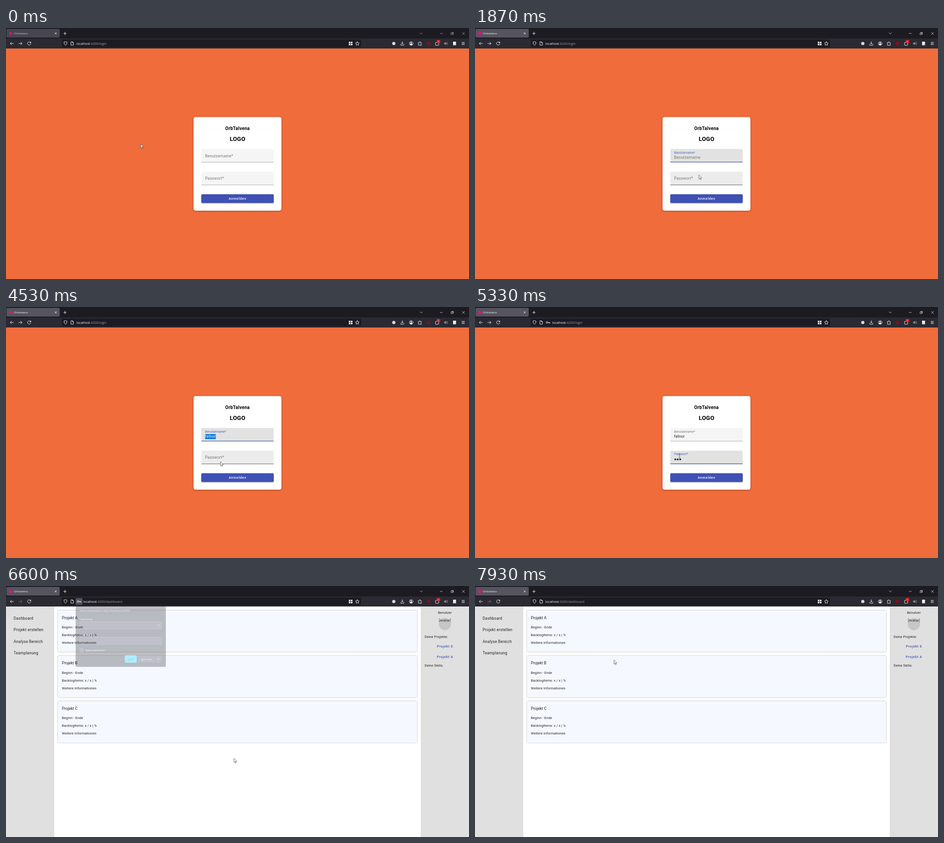
These frames come from a looping animation (1017 px wide and 551 px high, 8 s). An HTML page:

```html
<!DOCTYPE html>
<html lang="de">
<head>
<meta charset="utf-8">
<title>Login</title>
<style>
html, body { margin: 0; width: 100%; height: 100%; overflow: hidden; background: #fff; }
svg { display: block; width: 1017px; height: 551px; font-family: Roboto, sans-serif; }
.ui { font-family: "Open Sans", sans-serif; fill: #fbfbfe; }
.line { fill: none; stroke: #fbfbfe; stroke-width: .9; stroke-linecap: round; stroke-linejoin: round; }
.mid { text-anchor: middle; }
.big { font-size: 8.475px; letter-spacing: .265px; }
.small { font-size: 7.42px; letter-spacing: .13px; }
.btn { font-size: 7.42px; letter-spacing: .66px; font-weight: 500; }
.pop { font-size: 5.85px; }
.card { filter: drop-shadow(0 .6px .8px #0006); }
.soft { animation: 8s linear infinite; }
.hard { animation: 8s step-end infinite; }

#tab { animation-name: tab; }
#title, #fav, #win { animation-name: wake; }
#forward { animation-name: forward; }
#key { animation-name: key; }
#keybox { animation-name: keybox; }
#url { animation-name: url; }
#login { animation-name: login; }
#dash { animation-name: dash; }
#box1 { animation-name: box1; }
#box2 { animation-name: box2; }
#under1 { animation-name: under1; }
#under2 { animation-name: under2; }
#blue1 { animation-name: blue1; transform-origin: 508.5px 294px; }
#blue2 { animation-name: blue2; transform-origin: 508.5px 344px; }
#label1 { animation-name: label1; }
#label2 { animation-name: label2; }
#hint1 { animation-name: hint1; }
#hint2 { animation-name: hint2; }
#button { animation-name: button; }
#ripple { animation-name: ripple; }
#popup { animation-name: popup; }
#later { animation-name: later; }
#cursor { animation-name: move; }
#arrow { animation-name: arrow; }
#beam { animation-name: beam; }
#hand { animation-name: hand; }

@keyframes tab { 0% { fill: #464550; } 11.3%, 100% { fill: #55545f; } }
@keyframes wake { 0% { opacity: .72; } 11.3%, 100% { opacity: 1; } }
@keyframes forward { 0% { opacity: 1; } 82.5%, 100% { opacity: .4; } }
@keyframes key { 0% { opacity: 0; } 62.5% { opacity: 1; } 98.4%, 100% { opacity: 0; } }
@keyframes keybox { 0% { opacity: 0; } 82.5% { opacity: 1; } 98.4%, 100% { opacity: 0; } }
@keyframes url { 0% { transform: none; } 62.5% { transform: translateX(15px); } 98.4%, 100% { transform: none; } }
@keyframes login { 0% { visibility: visible; } 82.5%, 100% { visibility: hidden; } }
@keyframes dash { 0% { visibility: hidden; } 82.5%, 100% { visibility: visible; } }
@keyframes box1 { 0% { fill: #f5f5f5; } 8.3% { fill: #ececec; } 12.5% { fill: #e2e2e2; } 58.8%, 100% { fill: #f5f5f5; } }
@keyframes box2 { 0% { fill: #f5f5f5; } 18% { fill: #ececec; } 58.8% { fill: #e2e2e2; } 81.3%, 100% { fill: #f5f5f5; } }
@keyframes under1 { 0% { fill: #8d8d8d; } 8.3% { fill: #212121; } 16%, 100% { fill: #8d8d8d; } }
@keyframes under2 { 0% { fill: #8d8d8d; } 18% { fill: #212121; } 67.6%, 100% { fill: #8d8d8d; } }
@keyframes blue1 {
  0%, 12.5% { opacity: 0; transform: scaleX(0); }
  14.7%, 58.8% { opacity: 1; transform: none; }
  61%, 100% { opacity: 0; transform: none; }
}
@keyframes blue2 {
  0%, 58.8% { opacity: 0; transform: scaleX(0); }
  61%, 80.9% { opacity: 1; transform: none; }
  83%, 100% { opacity: .4; transform: none; }
}
@keyframes label1 {
  0%, 12.5% { transform: translate(437.3px, 283.5px); fill: #747474; }
  14.4%, 58.8% { transform: translate(437.3px, 275.6px) scale(.75); fill: #4e5eba; }
  60.6%, 100% { transform: translate(437.3px, 275.6px) scale(.75); fill: #747474; }
}
@keyframes label2 {
  0%, 58.8% { transform: translate(437.3px, 333.3px); fill: #747474; }
  60.6%, 80.9% { transform: translate(437.3px, 325.4px) scale(.75); fill: #4e5eba; }
  82.4%, 100% { transform: translate(437.3px, 325.4px) scale(.75); fill: #686a78; }
}
@keyframes hint1 { 0% { opacity: 0; } 14% { opacity: 1; } 29.1%, 100% { opacity: 0; } }
@keyframes hint2 { 0% { opacity: 0; } 60.4% { opacity: 1; } 62.5%, 100% { opacity: 0; } }
@keyframes button { 0% { fill: #3f51b5; } 73.6%, 100% { fill: #e96e40; } }
@keyframes ripple { 0%, 80.8% { r: 0; } 81.6% { r: 51px; } 83%, 100% { r: 80px; } }
@keyframes popup {
  0%, 82.4% { opacity: 0; }
  82.5%, 83.3% { opacity: .3; }
  85%, 97.4% { opacity: 1; }
  98.3% { opacity: .45; }
  99%, 100% { opacity: 0; }
}
@keyframes later { 0% { fill: #42414d; } 94.4%, 100% { fill: #5b5a66; } }
@keyframes move {
  0%, 1.6% { transform: translate(295.5px, 254.3px); }
  5% { transform: translate(385px, 270px); }
  9% { transform: translate(474px, 300px); }
  11.5%, 13% { transform: translate(468px, 287px); }
  16% { transform: translate(478px, 302px); }
  21.6%, 54.1% { transform: translate(491.5px, 322.5px); }
  57% { transform: translate(468px, 342px); }
  59%, 66.8% { transform: translate(449.2px, 326.4px); }
  69% { transform: translate(350px, 375px); }
  70.5% { transform: translate(308px, 397px); }
  72% { transform: translate(400px, 398px); }
  75%, 83.3% { transform: translate(500.5px, 378.3px); }
  86.6%, 90% { transform: translate(316px, 342.5px); }
  95%, 100% { transform: translate(305px, 162.2px); }
}
@keyframes arrow {
  0% { opacity: 1; }
  10.5% { opacity: 0; }
  14% { opacity: 1; }
  29.1% { opacity: 0; }
  54.1% { opacity: 1; }
  58.2% { opacity: 0; }
  67.5% { opacity: 1; }
  73.6% { opacity: 0; }
  82.5%, 100% { opacity: 1; }
}
@keyframes beam {
  0% { opacity: 0; }
  10.5% { opacity: 1; }
  14% { opacity: 0; }
  58.2% { opacity: 1; }
  67.5%, 100% { opacity: 0; }
}
@keyframes hand { 0% { opacity: 0; } 73.6% { opacity: 1; } 82.5%, 100% { opacity: 0; } }
</style>
</head>
<body>
<svg viewBox="0 0 1017 551">
  <defs>
    <g id="project">
      <rect class="card" x="114" y="53.5" width="789" height="91.3" rx="2" fill="#f5f8ff"/>
      <g class="small" fill="#212121">
        <text x="122.8" y="93.2">Beginn - Ende</text>
        <text x="122.8" y="110.2">Backlogitems: x / x | %</text>
        <text x="122.8" y="127.1">Weitere Informationen</text>
      </g>
    </g>
    <clipPath id="clip"><rect x="429" y="365" width="159" height="19" rx="2"/></clipPath>
  </defs>

  <g id="login" class="hard">
    <rect y="45" width="1017" height="506" fill="#f16c3b"/>
    <rect x="412" y="195.5" width="193" height="205.5" rx="4.2" fill="#fff" style="filter:drop-shadow(0 1.5px 2px #0005)"/>
    <g class="mid" font-weight="700">
      <text x="508.5" y="224.1" font-size="10" letter-spacing=".3">OrbTalvena</text>
      <text x="508.7" y="247.7" font-size="12.9" letter-spacing=".3">LOGO</text>
    </g>
    <g class="big">
      <path id="box1" class="hard" d="M429 295V267.5q0-2 2-2H586q2 0 2 2V295z"/>
      <rect id="under1" class="hard" x="429" y="294.3" width="159" height=".7"/>
      <rect id="blue1" class="soft" x="429" y="293.8" width="159" height="1.2" fill="#3f51b5"/>
      <text id="label1" class="soft">Benutzername*</text>
      <text id="hint1" class="hard" x="437.3" y="287.3" fill="#757575">Benutzername</text>
      <rect id="marked" x="437.3" y="279" height="11" fill="#0078d7"/>
      <text id="user" x="437.3" y="287.3"></text>
      <path id="box2" class="hard" d="M429 345V317.5q0-2 2-2H586q2 0 2 2V345z"/>
      <rect id="under2" class="hard" x="429" y="344.1" width="159" height=".7"/>
      <rect id="blue2" class="soft" x="429" y="343.7" width="159" height="1.2" fill="#3f51b5"/>
      <text id="label2" class="soft">Passwort*</text>
      <text id="hint2" class="hard" x="437.3" y="337.2" fill="#757575">Passwort</text>
      <g id="dots" fill="#212121">
        <circle cx="440" cy="334.6" r="2"/><circle cx="445.4" cy="334.6" r="2"/><circle cx="450.8" cy="334.6" r="2"/>
      </g>
      <rect id="caret" width=".7" height="11" fill="#212121"/>
    </g>
    <rect id="button" class="hard" x="429" y="365" width="159" height="19" rx="2" style="filter:drop-shadow(0 1px 1px #0006)"/>
    <g clip-path="url(#clip)"><circle id="ripple" class="soft" cx="500.5" cy="379" fill="#fff" opacity=".1"/></g>
    <text class="btn mid" x="508.6" y="376.8" fill="#fff">Anmelden</text>
  </g>

  <g id="dash" class="hard">
    <rect y="45" width="1017" height="506" fill="#fff"/>
    <path d="M0 45H106V551H0zM911 45h106V551H911z" fill="#e0e0e0"/>
    <use href="#project"/>
    <use href="#project" y="99.6"/>
    <use href="#project" y="199.2"/>
    <g font-size="8.475" fill="#212121">
      <text x="122.8" y="72.7">Projekt A</text>
      <text x="122.8" y="172.3">Projekt B</text>
      <text x="122.8" y="271.9">Projekt C</text>
    </g>
    <g class="big" fill="#212121">
      <text x="16.8" y="73.6">Dashboard</text>
      <text x="16.8" y="99.1">Projekt erstellen</text>
      <text x="16.8" y="124.5">Analyse Bereich</text>
      <text x="16.8" y="149.9">Teamplanung</text>
    </g>
    <circle cx="964" cy="83.6" r="13.4" fill="#c6c6c6"/>
    <g class="small" fill="#212121">
      <text class="mid" x="964" y="61.4">Benutzer</text>
      <text class="mid" x="964" y="78.4">[Avatar]</text>
      <text x="919.4" y="113.6">Deine Projekte:</text>
      <text x="919.4" y="177">Deine Skills:</text>
    </g>
    <g class="btn mid" fill="#3f51b5">
      <text x="964.3" y="134.7">Projekt E</text>
      <text x="964.3" y="157.9">Projekt A</text>
    </g>
  </g>

  <g id="chrome">
    <path d="M0 0H1017V23H0z" fill="#1c1b22"/>
    <path d="M0 23H1017V45H0z" fill="#2b2a33"/>
    <rect id="tab" class="hard" x="1" y="2" width="117" height="19" rx="2.2"/>
    <circle id="fav" class="hard" cx="10.3" cy="12" r="3.6" fill="#e0147c"/>
    <text id="title" class="ui hard" x="17.3" y="14.2" font-size="5.87">Orbtalvena</text>
    <path class="line" d="M107.4 10l3.6 3.6m0-3.6l-3.6 3.6M126.5 12h6m-3-3v6" stroke-width=".8"/>
    <g id="win" class="hard"><path class="line" style="stroke-width:.7" d="M909.5 10.5l2.7 2.7 2.7-2.7M953.5 12h5M978 11h3.6v3.6H978zM979.2 11V9.6h3.6v3.6h-1.2M1002.3 9.5l5 5m0-5l-5 5"/></g>
    <rect x="122.5" y="25.5" width="657.5" height="17" rx="2.2" fill="#1c1b22"/>
    <path class="line" d="M16.5 34H9.3m3-3l-3 3 3 3M54.2 32.3a3.6 3.6 0 1 0 .2 2.7M54.6 30.4v2.3h-2.3"/>
    <path id="forward" class="line hard" d="M28 34h7.2m-3-3l3 3-3 3"/>
    <path class="line" d="M130.7 30l3.4 1.2q.2 5-3.4 6.8-3.6-1.8-3.4-6.8zM143 30.3h3.2l2 2v5.4H143zM146 30.5v2h2"/>
    <rect id="keybox" class="hard" x="153" y="26.4" width="15" height="15" rx="2" fill="#52515d"/>
    <g id="key" class="line hard"><circle cx="158" cy="34" r="1.8"/><path d="M160 34h4.6v1.8m-2-1.8v1.2"/></g>
    <text id="url" class="ui hard" x="154.8" y="36.7" font-size="7.05">localhost<tspan id="path" fill="#9b9aa2"></tspan></text>
    <path d="M753 30.2h3.4v3.4H753zM757.6 30.2h3.4v3.4h-3.4zM753 34.6h3.4V38H753zM757.6 34.6h3.4V38h-3.4z" fill="#fbfbfe"/>
    <path class="line" d="M771.7 29.9l1.3 2.7 2.9.4-2.1 2 .5 3-2.6-1.4-2.6 1.4.5-3-2.1-2 2.9-.4z"/>
    <circle cx="851.8" cy="34" r="3.6" fill="#d8d8dd"/>
    <path class="line" d="M870.5 30v5m-2-2l2 2 2-2M867.2 35.6v2.2h6.6v-2.2"/>
    <circle class="line" cx="890" cy="34" r="3.9"/>
    <path d="M890 31.2a1.5 1.5 0 0 1 0 3 1.5 1.5 0 0 1 0-3zM887.3 36.6q0-2 2.7-2t2.7 2q-2.7 2.2-5.4 0z" fill="#fbfbfe"/>
    <path class="line" d="M906 32h2v-1q1-1.6 2 0v1h2.3v2q-2 .8 0 2v2H906v-2q2-1.2 0-2z"/>
    <circle cx="928" cy="34" r="3.8" fill="#80101c"/>
    <rect class="line" x="943.4" y="31.5" width="7" height="6.5" rx="1"/>
    <rect x="946" y="26.6" width="7.6" height="6.6" rx="1" fill="#e1222e"/>
    <text class="ui mid" x="949.8" y="31.8" font-size="5">1</text>
    <g opacity=".5"><path d="M962.3 32.5h1.8l2.2-2v7l-2.2-2h-1.8z" fill="#fbfbfe"/><path class="line" d="M967.5 32.3q1.2 1.7 0 3.4M969 31q2.2 3 0 6"/></g>
    <path d="M982 30h6.5v8H982z" fill="#f0f0f4"/>
    <path d="M983 36.4h5.5" stroke="#888" stroke-width=".6"/>
    <path class="line" d="M1001.5 31.6h5.6m-5.6 2.4h5.6m-5.6 2.4h5.6"/>
  </g>

  <g id="popup" class="ui pop soft">
    <rect x="153" y="40.5" width="198" height="137" rx="3" fill="#2b2a33"/>
    <text x="162" y="56.2">Save password for http://localhost:4200?</text>
    <text x="162" y="75.1">Username</text>
    <text x="162" y="109">Password</text>
    <g fill="#42414d" stroke="#8f8f9d" stroke-width=".6">
      <rect x="162.3" y="78.5" width="179.7" height="15.7" rx="2"/>
      <rect x="162.3" y="112.4" width="179.7" height="15.7" rx="2"/>
      <rect x="162.3" y="137.3" width="7.6" height="7.6" rx="1"/>
    </g>
    <g id="saved">
      <text x="167" y="88.5">felnor</text>
      <text x="167" y="122.4">•••</text>
    </g>
    <path class="line" d="M333 85.6l1.8 1.8 1.8-1.8"/>
    <text x="174" y="143.3">S<tspan text-decoration="underline">h</tspan>ow password</text>
    <rect x="261" y="151.8" width="26.3" height="16.6" rx="2" fill="#00ddff"/>
    <text class="mid" x="274" y="162.7" fill="#2b2a33"><tspan text-decoration="underline">S</tspan>ave</text>
    <rect id="later" class="hard" x="290" y="151.8" width="37.4" height="16.6" rx="2"/>
    <rect x="328" y="151.8" width="14" height="16.6" rx="2" fill="#42414d"/>
    <text class="mid" x="308.8" y="162.7"><tspan text-decoration="underline">N</tspan>ot now</text>
    <path class="line" d="M333 159.4l1.8 1.8 1.8-1.8"/>
  </g>

  <g id="cursor" class="soft">
    <path id="arrow" class="hard" d="M.3 0V9.2L2.4 7.2 3.8 10.4 5.2 9.8 3.8 6.7H6.6z" fill="#fff" stroke="#111" stroke-width=".6"/>
    <path id="beam" class="hard" d="M-1.6-4.6H-.4L0-4.2.4-4.6H1.6M0-4.2V4.2M-1.6 4.6H-.4L0 4.2.4 4.6H1.6" fill="none" stroke="#222" stroke-width=".7"/>
    <path id="hand" class="hard" d="M.3 1q.9-1.4 1.8 0V4.6L6 5.5q1 .4.8 1.5L6 11.5H1.4L-1.8 7.4q0-1.3 1.2-.9L.3 7.4z" fill="#fff" stroke="#111" stroke-width=".6"/>
  </g>
</svg>
<script>
const LOOP = 8000, NAME = "felnor";
const nameKeys = [2330, 2530, 2630, 2730, 2830, 2930];
const passKeys = [5000, 5130, 5270];
const caretOn = [[1000, 1530], [2070, 3130], [3670, 3730], [4700, 5270], [5400, 5930]];
const el = id => document.getElementById(id);
const typed = (keys, t) => keys.filter(k => t >= k).length;
const within = (t, [from, to]) => t >= from && t < to;
const show = (node, on) => node.setAttribute("opacity", on ? 1 : 0);

const user = el("user"), caret = el("caret"), marked = el("marked"), dots = [...el("dots").children];

function draw(t) {
  const inPass = t >= 4700, selected = within(t, [3730, 4700]);
  const chars = typed(nameKeys, t), hidden = typed(passKeys, t);
  user.textContent = NAME.slice(0, chars);
  user.setAttribute("fill", selected ? "#fff" : "#212121");
  const width = chars ? user.getComputedTextLength() : 0;
  marked.setAttribute("width", width);
  show(marked, selected);
  dots.forEach((dot, i) => show(dot, i < hidden));
  caret.setAttribute("x", 437.3 + (inPass ? hidden * 5.4 : width));
  caret.setAttribute("y", inPass ? 329 : 279);
  show(caret, caretOn.some(span => within(t, span)));
  show(el("saved"), t >= 6670);
  el("path").textContent = t < 6600 ? ":4200/login" : ":4200/dashboard";
}

// Keyframes and script share one clock.
const start = performance.now();
document.getAnimations().forEach(a => a.startTime = start);
function tick(now) {
  draw(Math.max(0, now - start) % LOOP);
  requestAnimationFrame(tick);
}
draw(0);
requestAnimationFrame(tick);
</script>
</body>
</html>
```
